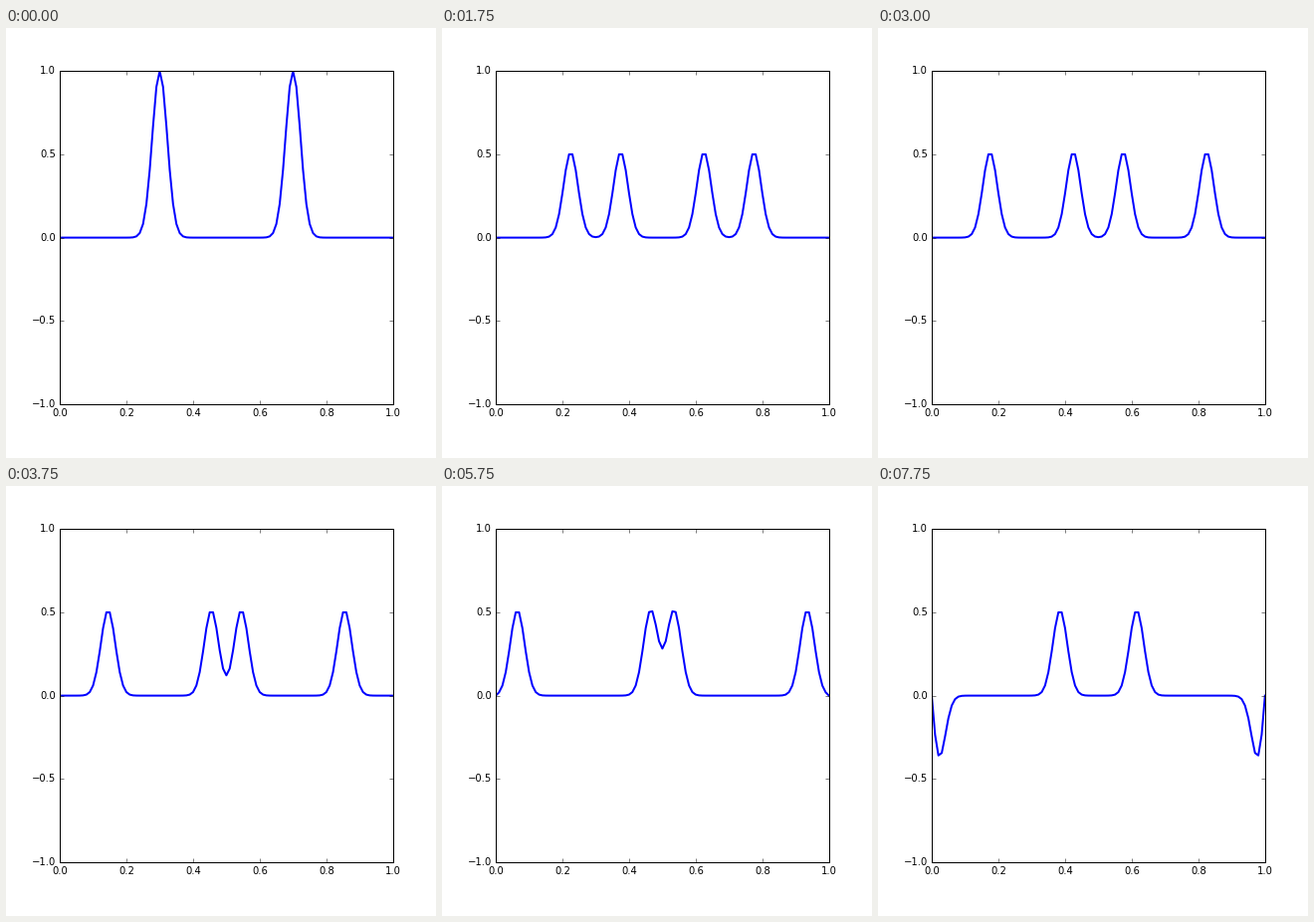
Animation, 432 px wide and 432 px high, one loop 8000 ms. Source, as a matplotlib script:

```python
import numpy as np
import matplotlib.pyplot as plt
from matplotlib.animation import FuncAnimation

FRAMES = 32
INTERVAL = 250
POINTS = 101

plt.style.use("classic")
plt.rcParams.update({
    "figure.dpi": 72,
    "savefig.dpi": "figure",
    "figure.facecolor": "white",
    "savefig.facecolor": "white",
    "font.family": "DejaVu Sans",
    "font.size": 10,
    "axes.unicode_minus": True,
})


def solve_wave(start, steps):
    """Leapfrog solution of the wave equation with unit Courant number and fixed ends."""
    states = [start]
    before = now = start
    for _ in range(steps - 1):
        after = np.zeros_like(now)
        after[1:-1] = now[2:] + now[:-2] - before[1:-1]
        before, now = now, after
        states.append(now)
    return states


x = np.linspace(0, 1, POINTS)
pulses = np.exp(-1000 * (x - 0.3) ** 2) + np.exp(-1000 * (x - 0.7) ** 2)
states = solve_wave(pulses, FRAMES)

fig = plt.figure(figsize=(6, 6), dpi=72, facecolor="white")
ax = fig.add_axes([0.125, 0.125, 0.775, 0.775])
ax.set_xlim(0, 1)
ax.set_ylim(-1, 1)
ax.set_xticks(np.linspace(0, 1, 6))
ax.set_yticks(np.linspace(-1, 1, 5))
line, = ax.plot(x, states[0], color="blue", lw=2)


def update(frame):
    line.set_ydata(states[frame])
    return line,


anim = FuncAnimation(fig, update, frames=FRAMES, interval=INTERVAL,
                     repeat=True, repeat_delay=0, blit=False)
plt.show()
```
